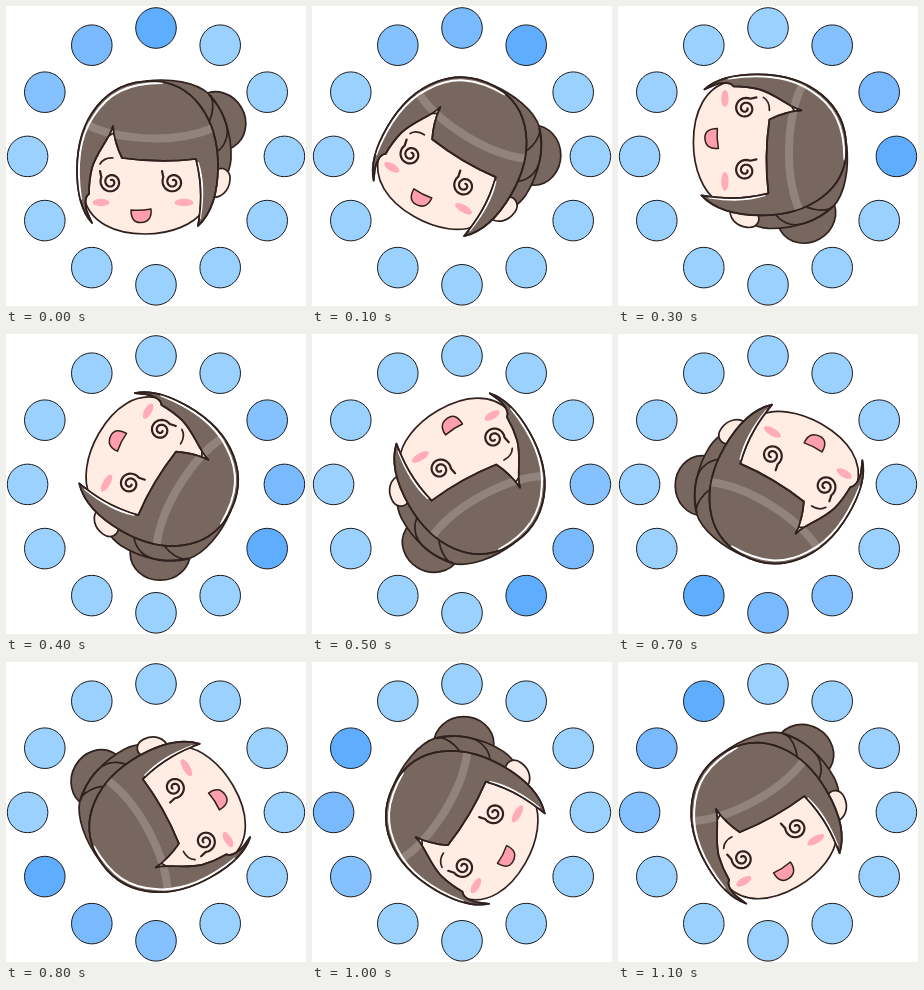
An HTML page that plays this animation: 300 px wide and 300 px high, repeating every 1200 ms.

```html
<!DOCTYPE html>
<html lang="en">
<head>
<meta charset="utf-8">
<title>Dizzy spinner</title>
<style>
  html, body { margin: 0; width: 100%; height: 100%; overflow: hidden; background: #fff; }
  svg { display: block; width: 100vw; height: 100vh; }
</style>
</head>
<body>
<svg viewBox="0 0 300 300">
  <defs>
    <path id="hair" d="M86 217C75 205 71 186 71 164C71 112 100 75 145 75C187 75 212 113 212 160C212 185 206 207 192 220C195 202 197 181 190 153C165 156 137 155 116 152C111 142 108 132 107 120C103 134 91 145 86 162C84 170 83 180 83 188C78 191 79 202 82 208Z"/>
    <clipPath id="hairClip"><use href="#hair"/></clipPath>
  </defs>
  <g id="dots" stroke="#1c1c1c" stroke-width="1"></g>
  <g id="head" fill="none" stroke="#30211e" stroke-width="1.7" stroke-linecap="round" stroke-linejoin="round">
    <g fill="#78675f">
      <ellipse rx="27" ry="30" transform="translate(212 115) rotate(-30)"/>
      <path d="M140 75C164 72 190 76 203 88C217 102 226 128 225 153C224 166 217 179 208 186L170 150Z"/>
    </g>
    <path d="M203 89C216 103 226 122 219 136Q216 143 209 147M204 114Q209 101 205 90"/>
    <path fill="#ffede3" d="M209 165C217 159 225 165 224 174C223 185 215 193 204 191Z"/>
    <path fill="#ffede3" d="M77 145L78 192C84 216 108 228 139 228C166 228 188 218 197 205L202 145L140 108Z"/>
    <use href="#hair" fill="#78675f"/>
    <path clip-path="url(#hairClip)" stroke="#92847d" stroke-width="8" stroke-linecap="butt" d="M79 117C100 132 165 140 207 122"/>
    <g stroke="#fff" stroke-width="2">
      <path d="M75 193C71 166 71 135 87 111C102 87 122 77 156 77"/>
      <path d="M192 157C198 176 197 194 194 212"/>
    </g>
    <use href="#hair"/>
    <path d="M94 158Q98 151.500 107 152"/>
    <g id="eyes" stroke-width="2.2"></g>
    <g fill="#ffabb8" stroke="none">
      <ellipse cx="95" cy="196.500" rx="8.500" ry="3.700"/>
      <ellipse cx="178" cy="196.500" rx="9.500" ry="3.700"/>
    </g>
    <path fill="#ff9fae" stroke-width="1.500" d="M125 204Q135 205 145 203C146 212 142 216 135 216.500C128 217 125 212 125 204Z"/>
  </g>
</svg>
<script>
  const SVG = "http://www.w3.org/2000/svg";
  const STEPS = 12, STEP_MS = 100;
  const TRAIL = ["#5eadff", "#79baff", "#85c1ff"], IDLE = "#9bd1ff";
  const head = document.getElementById("head");

  function add(parentId, tag, attrs) {
    const node = document.createElementNS(SVG, tag);
    for (const key in attrs) node.setAttribute(key, attrs[key]);
    return document.getElementById(parentId).appendChild(node);
  }

  // Spiral winding inwards from a short tail at the upper left.
  function spiral(cx, cy) {
    const points = [[cx - 11, cy - 11]];
    for (let i = 0; i <= 60; i++) {
      const t = i / 60, angle = 3.6 - t * 11.5, r = 10.8 - 8.8 * t;
      points.push([cx + r * Math.cos(angle), cy + r * Math.sin(angle)]);
    }
    return "M" + points.map(p => p.map(v => v.toFixed(2)).join(" ")).join("L");
  }

  for (const x of [105, 167]) add("eyes", "path", { d: spiral(x, 176) });

  const dots = Array.from({ length: STEPS }, (_, i) => {
    const angle = i / STEPS * 2 * Math.PI;
    return add("dots", "circle", {
      cx: 150 + 128.4 * Math.sin(angle),
      cy: 150.4 - 128.4 * Math.cos(angle),
      r: 20.3
    });
  });

  function draw(ms) {
    const step = Math.floor(ms / STEP_MS) % STEPS;
    head.setAttribute("transform", `rotate(${step * 360 / STEPS} 153 150.4)`);
    dots.forEach((dot, i) => {
      dot.setAttribute("fill", TRAIL[(step - i + STEPS) % STEPS] || IDLE);
    });
  }

  let start;
  function tick(now) {
    start ??= now;
    draw(now - start);
    requestAnimationFrame(tick);
  }
  draw(0);
  requestAnimationFrame(tick);
</script>
</body>
</html>
```
